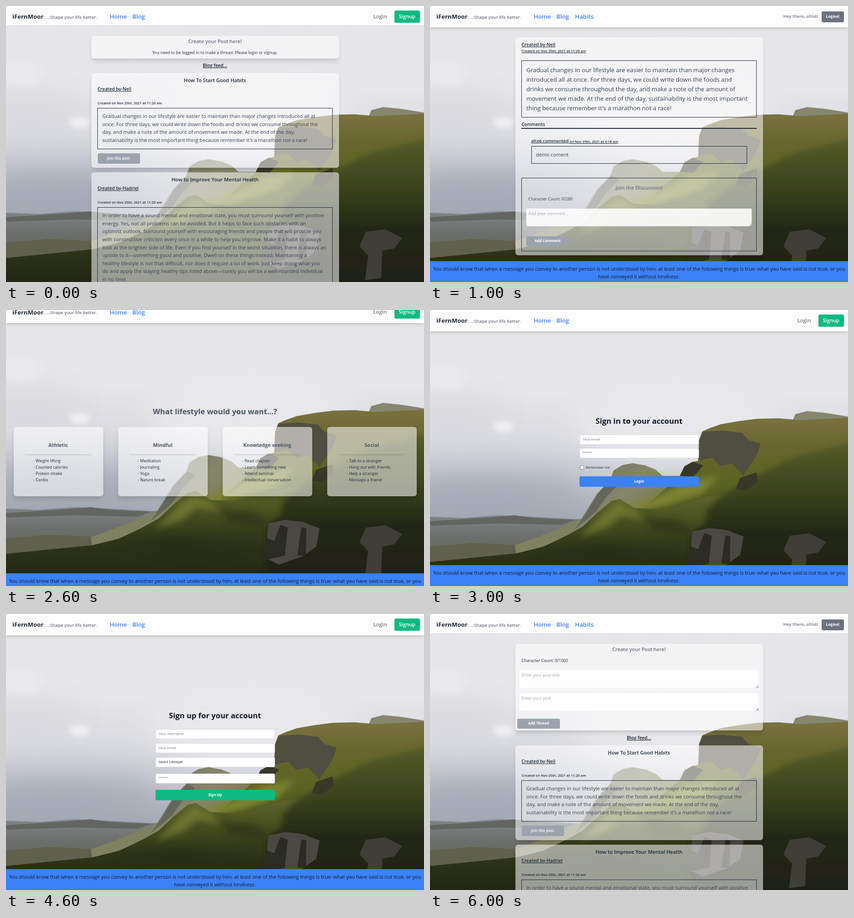
An HTML page for the animation above (7000 ms loop, 920 px wide and 609 px high).

```html
<!DOCTYPE html>
<html lang="en">
<head>
<meta charset="utf-8">
<title>Lifestyle blog tour</title>
<style>
html, body { margin: 0; width: 100%; height: 100%; overflow: hidden; background: #fff; }
#stage { position: relative; width: 920px; height: 609px; overflow: hidden;
  font-family: "Open Sans", "Noto Sans", sans-serif; color: #1f2937; }
#stage div, #scene { position: absolute; box-sizing: border-box; }
.page { inset: 0; visibility: hidden; }
.t { line-height: 0; white-space: pre; margin-top: -.12em; }
.c { width: 920px; margin-left: -460px; text-align: center; }
.s { font-weight: 600; }
.b { font-weight: 700; }
.u { text-decoration: underline; }
.w { color: #fff; }
.g { color: #6b7280; }
.d { color: #4b5563; }
.m { color: #374151; }
.p { color: #9ca3af; }
.l { color: #3b82f6; }
.k { color: #111827; }
.card { background: rgba(255,255,255,.55); border-radius: 6px; box-shadow: 0 7px 11px -2px #0002, 0 3px 4px -2px #0001; }
.frame { border: 1.5px solid #1f2937; }
.area { background: rgba(255,255,255,.88); }
.grip { background: linear-gradient(135deg, #0000 45%, #777 45% 57%, #0000 57% 72%, #777 72% 84%, #0000 84%); }
.input { background: #fff; border: 1px solid #d9dbe0; border-radius: 3px; }
.check { background: #fff; border: 1px solid #767676; border-radius: 2px; }
.btn { border-radius: 3px; }
</style>
</head>
<body>
<div id="stage">
<svg id="scene" width="920" height="640" viewBox="0 0 920 640">
  <defs>
    <linearGradient id="sky" x2="0" y2="1">
      <stop offset="0" stop-color="#e6e5e8"/><stop offset=".28" stop-color="#e7e7ea"/>
      <stop offset=".45" stop-color="#d9dadf"/><stop offset=".6" stop-color="#c0c3cc"/>
      <stop offset=".73" stop-color="#a3a8b3"/>
    </linearGradient>
    <linearGradient id="plain" x2="0" y2="1"><stop stop-color="#80858c"/><stop offset=".4" stop-color="#6d6f6d"/><stop offset="1" stop-color="#5f6153"/></linearGradient>
    <linearGradient id="far" x2="1" y2=".5"><stop stop-color="#6f7166"/><stop offset=".5" stop-color="#85866a"/><stop offset="1" stop-color="#74763e"/></linearGradient>
    <linearGradient id="slope" x2="0" y2="1"><stop stop-color="#7b7140"/><stop offset=".25" stop-color="#68672e"/><stop offset=".6" stop-color="#5a6422"/><stop offset="1" stop-color="#3c451c"/></linearGradient>
    <linearGradient id="front" x2="0" y2="1"><stop stop-color="#62682e"/><stop offset=".25" stop-color="#4a5221"/><stop offset=".5" stop-color="#30371a"/><stop offset="1" stop-color="#1c2112"/></linearGradient>
    <linearGradient id="bluff" x2="0" y2="1"><stop stop-color="#555b28"/><stop offset=".3" stop-color="#3b431d"/><stop offset=".55" stop-color="#222716"/><stop offset="1" stop-color="#1d1f17"/></linearGradient>
    <filter id="soft" x="-50%" y="-50%" width="200%" height="200%"><feGaussianBlur stdDeviation="7"/></filter>
    <filter id="haze" x="-50%" y="-50%" width="200%" height="200%"><feGaussianBlur stdDeviation="32"/></filter>
  </defs>
  <path fill="url(#sky)" d="M0 0H920V640H0z"/>
  <g filter="url(#haze)">
    <ellipse cx="110" cy="405" rx="230" ry="45" fill="#979dab" opacity=".55"/>
    <ellipse cx="50" cy="225" rx="120" ry="35" fill="#cfcfd5" opacity=".5"/>
    <ellipse cx="540" cy="240" rx="230" ry="100" fill="#e8e8eb"/>
  </g>
  <g filter="url(#soft)" fill="#f3f3f4"><ellipse cx="162" cy="257" rx="23" ry="11"/><ellipse cx="35" cy="150" rx="45" ry="28" opacity=".35"/></g>
  <path fill="url(#plain)" d="M0 456L70 459 150 453 200 455 330 462V570H0z"/>
  <path fill="#62665f" d="M0 466L130 458 185 453 235 459 320 463 290 474 150 471 0 476z"/>
  <path fill="#5f614d" d="M0 522L90 514 190 518 240 560 0 560z"/>
  <path fill="#7f8262" d="M187 519Q255 496 330 461L450 440 400 560 190 540z"/>
  <path fill="url(#far)" d="M316 487L343 445 368 405 397 374 404 354 424 342 446 338 474 343 496 352 512 366 555 366 600 420 480 470 390 480z"/>
  <path fill="#64675b" d="M318 485L346 444 369 406 400 374 416 384 390 410 365 445z"/>
  <path fill="#87866f" d="M797 246L804 230 830 223 870 227 920 235V250z"/>
  <path fill="url(#slope)" d="M550 366L560 345 578 335 590 333 592 287 599 268 615 261 640 252 681 245 720 240 768 239 812 243 920 238V480H420z"/>
  <path fill="#504e40" d="M592 332L593 287 601 269 642 266 686 271 702 287 728 295 718 322 690 365 665 338 640 345 620 326z"/>
  <path fill="#363629" d="M550 366L560 345 578 335 601 343 580 368z"/>
  <path fill="#7b8231" filter="url(#soft)" d="M440 432L500 410 560 380 635 365 600 405 520 432 465 445z"/>
  <path fill="url(#front)" d="M0 556L90 547 190 537 250 522 300 498 336 478 370 446 400 421 417 417 450 437 520 440 610 412 720 400V640H0z"/>
  <path fill="#7a8136" filter="url(#soft)" opacity=".7" d="M385 446L416 423 447 442 475 462 420 453 390 480 330 500z"/>
  <path fill="#252b13" filter="url(#soft)" opacity=".5" d="M470 455L550 465 580 495 490 488zM240 535L380 515 560 545 400 575z"/>
  <path fill="url(#bluff)" filter="url(#soft)" d="M573 660L577 490 606 470 610 440 645 408 690 384 740 355 800 325 940 290V660z"/>
  <path fill="#383828" d="M673 395L682 371 719 358 722 378 695 399z"/>
  <path fill="#4a4842" d="M572 565L577 489 615 481 655 486 690 500 683 540 652 562 600 580z"/>
  <path fill="#2b2b25" d="M566 570L572 520 590 528 604 492 620 498 614 560zM641 560L650 497 661 500 660 560z"/>
  <path fill="#3f3e37" d="M778 530L792 498 835 493 872 512 855 535 828 540 826 600 790 605 797 550z"/>
</svg>
</div>
<script>
const stage = document.getElementById('stage'), scene = document.getElementById('scene');
const GREEN = '#10b981', BLUE = '#3b82f6', GRAY = '#6b7280', PALE = '#9ca3af';
const BRAND = 'iFernMoor', USER = 'alto6';
let page;

const add = (cls, css, text = '') => {
  const el = document.createElement('div');
  el.className = cls;
  el.style.cssText = css;
  el.textContent = text;
  (page || stage).append(el);
  return el;
};
const box = (cls, x, y, w, h, css = '') =>
  add(cls, `left:${x}px;top:${y}px;width:${w}px;height:${h}px;${css}`);
// y is the middle of the lowercase letters
const text = (x, y, s, size = 11.06, cls = '') =>
  add('t ' + cls, `left:${x}px;top:${y}px;font-size:${size}px`, s);
const lines = (x, y, pitch, list, size, cls) =>
  list.forEach((s, i) => text(x, y + i * pitch, s, size, cls));
const button = (x, y, w, h, color, label, size = 8.1, cls = 'b') => {
  box('btn', x, y, w, h, 'background:' + color);
  text(x + w / 2, y + h / 2 + .5, label, size, 'c w ' + cls);
};
const area = (x, y, w, h, hint) => {
  box('area', x, y, w, h);
  box('grip', x + w - 6, y + h - 6, 6, 6);
  text(x + 5, y + 12.5, hint, 9, 'p');
};
const input = (y, hint, cls = 'g') => {
  box('input', 329, y, 262.5, 22);
  const hidden = hint[0] === '*';
  text(336, y + 11, hint, hidden ? 6.2 : 7.75, cls);
};

function header(loggedIn, height = 47, dy = 0) {
  box('', 0, 0, 920, height + dy, 'background:#fffffff5;' +
    (height > 42 ? 'box-shadow:0 4px 6px -1px #0002,0 2px 4px -1px #0001' : ''));
  text(14, 25 + dy, BRAND, 13.2, 'b');
  text(81, 26 + dy, '......Shape your life better.', 9.7, 's g');
  text(228, 25 + dy, 'Home', 13.2, 's l');
  text(278, 25 + dy, 'Blog', 13.2, 's l');
  if (loggedIn) {
    text(319, 25 + dy, 'Habits', 13.2, 's l');
    text(777.5, 24.5 + dy, `Hey there, ${USER}!`, 9.7, 's g');
    button(862, 12, 48.5, 23.5, GRAY, 'Logout', 8.7);
  } else {
    text(808.5, 24 + dy, 'Login', 11.3, 's g');
    button(854.5, 10 + dy, 56.5, 27, GREEN, 'Signup', 11.2, 's');
  }
}

function footer(y = 562.5) {
  box('', 0, y, 920, 60, 'background:' + BLUE);
  lines(460, y + 18.5, 17, [
    'You should know that when a message you convey to another person is not understood by him, at least one of the following things is true: what you have said is not true, or you',
    'have conveyed it without kindness.', '- Talia Dorne'], 11.08, 'c k');
}

const HABITS = ['How To Start Good Habits', 'Neil', [
  'Gradual changes in our lifestyle are easier to maintain than major changes introduced all at',
  'once. For three days, we could write down the foods and drinks we consume throughout the',
  'day, and make a note of the amount of movement we made. At the end of the day,',
  "sustainability is the most important thing because remember it's a marathon not a race!"]];
const HEALTH = ['How to Improve Your Mental Health', 'Hadriel', [
  'In order to have a sound mental and emotional state, you must surround yourself with positive',
  'energy. Yes, not all problems can be avoided. But it helps to face such obstacles with an',
  'optimist outlook. Surround yourself with encouraging friends and people that will provide you',
  'with constructive criticism every once in a while to help you improve. Make it a habit to always',
  'look at the brighter side of life. Even if you find yourself in the worst situation, there is always an',
  'upside to it—something good and positive. Dwell on these things instead. Maintaining a',
  'healthy lifestyle is not that difficult, nor does it require a lot of work. Just keep doing what you',
  'do and apply the staying healthy tips listed above—surely you will be a well-rounded individual',
  'in no time.']];

function post(y, [title, author, body]) {
  const h = 21.5 + body.length * 17.6;
  box('card', 187.5, y, 545.5, h + 118);
  text(460, y + 17.5, title, 11.1, 'c s');
  text(201.5, y + 36.5, 'Created by-' + author, 10, 's u');
  text(201.5, y + 67, 'Created on Nov 25th, 2021 at 11:20 am', 7.65, 's');
  box('frame', 201, y + 77, 518, h);
  lines(212, y + 97, 17.6, body, 11.06, 'm');
  button(201.5, y + h + 86, 93.5, 22.5, PALE, 'Join this post.', 8, 's');
}
function feed(y) {
  text(460, y, 'Blog feed...', 10.1, 'c s u k');
  post(y + 15.5, HABITS);
  post(y + 234.5, HEALTH);
}

const pages = [
  () => {
    header(false, 42);
    box('card', 187.5, 66, 545.5, 49.5);
    text(460, 79.5, 'Create your Post here!', 11, 'c s g');
    text(460, 104, 'You need to be logged in to make a thread. Please login or signup.', 9, 'c');
    feed(132);
  },
  () => {
    header(true);
    box('card', 187.5, 69, 545.5, 480.5);
    text(201.5, 86.5, 'Created by-Neil', 10, 's u');
    text(201.5, 100, 'Created on Nov 25th, 2021 at 11:20 am', 7.65, 's u');
    box('frame', 201, 119.5, 518, 126.5);
    lines(212, 142.5, 21.1, [
      'Gradual changes in our lifestyle are easier to maintain than major changes',
      'introduced all at once. For three days, we could write down the foods and',
      'drinks we consume throughout the day, and make a note of the amount of',
      'movement we made. At the end of the day, sustainability is the most important',
      "thing because remember it's a marathon not a race!"], 13.25, 'm');
    text(201.5, 263.5, 'Comments', 9.8, 's');
    box('', 201, 269, 518, 1.5, 'background:#1f2937');
    text(222.5, 299.5, USER + ' commented ', 9.7, 's u');
    text(307.5, 300, 'on Nov 29th, 2021 at 4:18 am', 7.65, 's u');
    box('frame', 222.5, 309, 475.5, 39);
    text(233, 329, 'demo coment', 11.06, 'm');
    box('frame', 201, 378.5, 518, 162);
    text(460, 402.5, 'Join the Discussion!', 11.1, 'c s g');
    text(216.5, 427, 'Character Count: 0/280', 9, 'm');
    area(212, 447, 496, 38.5, 'Add your comment...');
    button(212, 507.5, 93.5, 22.5, PALE, 'Add Comment');
    footer();
  },
  () => {
    header(false, 47, -18.5);
    text(460, 226, 'What lifestyle would you want...?', 16.6, 'c b d');
    [['Athletic', 'Weight lifting', 'Counted calories', 'Protein intake', 'Cardio'],
     ['Mindful', 'Meditation', 'Journaling', 'Yoga', 'Nature break'],
     ['Knowledge seeking', 'Read chapter', 'Learn something new', 'Attend seminar', 'Intellectual conversation'],
     ['Social', 'Talk to a stranger', 'Hang out with friends', 'Help a stranger', 'Message a friend']
    ].forEach(([title, ...items], i) => {
      const x = 16.5 + i * 230;
      box('card', x, 258, 197, 152.5);
      box('', x + 23.5, 281, 150, 36.5, 'border-radius:6px;box-shadow:0 4px 4px -2px #0002');
      text(x + 98.5, 299.5, title, 11.06, 'c b d');
      lines(x + 43.5, 334, 14.1, items.map(s => '- ' + s), 9);
    });
    footer(581);
  },
  () => {
    header(false);
    text(460, 246.5, 'Sign in to your account', 16.7, 'c b k');
    input(274.5, 'Your email');
    input(305, '******');
    box('check', 329.5, 342.5, 9.5, 9.5);
    text(343, 348, 'Remember me', 7.65);
    button(329, 367, 262.5, 22.5, BLUE, 'Login');
    footer();
  },
  () => {
    header(false);
    text(460, 226, 'Sign up for your account', 16.7, 'c b k');
    input(253.5, 'Your username');
    input(284.5, 'Your email');
    input(316, 'Select Lifestyle', 'k');
    input(352, '******');
    button(329, 388, 262.5, 22.5, GREEN, 'Sign Up');
    footer();
  },
  () => {
    header(true);
    text(460, 201.5, 'Your lifestyle:', 16.6, 'c b');
    box('card', 145.5, 234.5, 613, 200, 'background:#ffffffcc;border-radius:3px');
    text(455.5, 257, 'Mindful', 11.06, 'c b d');
    box('', 162, 278.5, 580, 1, 'background:#e2e4e8');
    ['Meditation:', 'Journaling:', 'Yoga:', 'Nature break:'].forEach((label, i) => {
      const y = 284 + i * 35.2, long = i < 2;
      text(182, y + 16, label, 11.06, 'b u k');
      for (let day = 0; day < (long ? 5 : 4); day++) {
        const x = 291.5 + day * (long ? 45.4 : 52.9);
        box('check', x, y + 11, 7.5, 7.5);
        text(x + 7.5, y + 15, 'Day ' + (day + 1));
      }
      button(long ? 518.5 : 503.5, y, 48, 26, GRAY, 'Reset', 11.06, 's');
      button(long ? 572 : 564.5, y, 44.5, 26, BLUE, 'Load', 11.06, 's');
      button(622.5, y, 95.5, 26, GREEN, 'Save Progress!', 11.06, 's');
    });
    footer();
  },
  () => {
    header(true, 42);
    box('card', 187.5, 66, 545.5, 191);
    text(460, 79.5, 'Create your Post here!', 11, 'c s g');
    text(201.5, 104, 'Character Count: 0/1000', 9);
    area(197, 124, 526, 38.5, 'Enter your post title');
    area(197, 174.5, 526, 38.5, 'Enter your post');
    button(192, 230.5, 94, 22, PALE, 'Add Thread');
    feed(274);
  }
].map(build => {
  page = null;
  page = add('page', '');
  build();
  return page;
});

function tick() {
  const current = Math.floor(performance.now() / 1000) % pages.length;
  pages.forEach((el, i) => el.style.visibility = i === current ? 'visible' : 'hidden');
  scene.style.top = current === 2 ? '-18.5px' : '0';
  requestAnimationFrame(tick);
}
tick();
</script>
</body>
</html>
```
